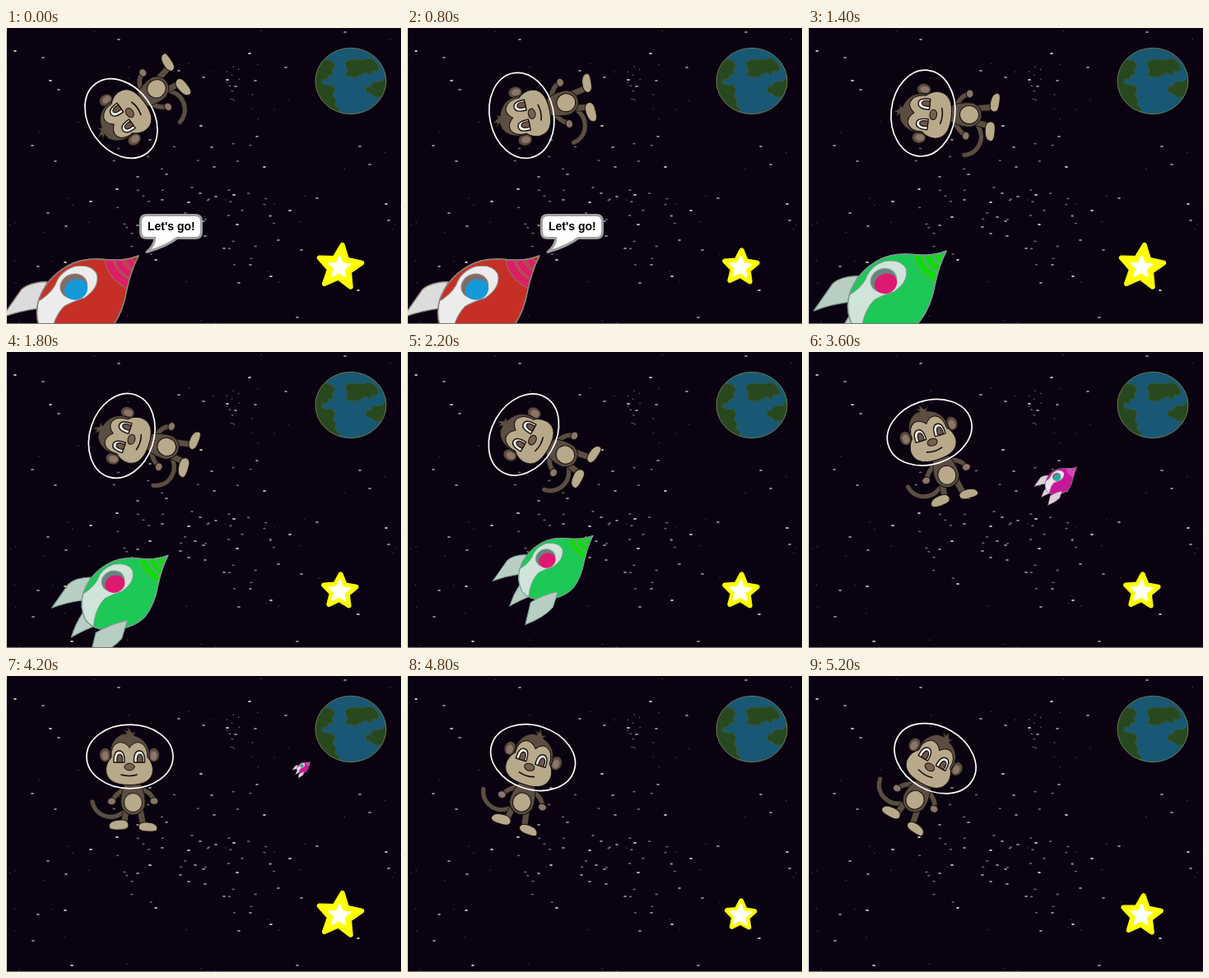
An HTML page with a canvas for the animation above (5400 ms loop, 480 by 360 pixels).

```html
<!DOCTYPE html>
<html lang="en">
<head>
<meta charset="utf-8">
<title>Space trip</title>
<style>
html, body { margin: 0; width: 100%; height: 100%; overflow: hidden; background: #0a0210; }
canvas { display: block; }
</style>
</head>
<body>
<canvas id="stage" width="480" height="360"></canvas>
<script>
const ctx = document.getElementById('stage').getContext('2d');
const LOOP = 5400, STEP = 200, TAU = Math.PI * 2;

const bright = [
  11,28, 45,36, 137,14, 296,31, 412,5, 210,52, 54,64, 64,75, 340,48, 445,55, 240,60,
  32,143, 103,211, 242,253, 39,290, 72,285, 51,225, 73,241, 462,214, 378,207, 442,166,
  314,169, 430,144, 305,132, 222,212, 236,201, 331,258, 281,239, 359,270, 33,322, 80,352,
  354,352, 465,234, 428,319, 265,268, 297,288, 182,282, 190,209, 230,230, 135,196, 60,162,
  250,145, 277,203, 175,136, 253,169, 322,302, 283,310, 212,242, 269,63, 279,71, 303,64,
  237,119, 160,181, 195,178, 345,222, 222,250, 240,235, 175,230, 160,240, 255,205
];

const palettes = {
  red: { body: '#c62f25', stripe: '#dc1e66', fin: '#dcdcdc', band: '#ececec', glass: '#1699d8', shade: '#806c66', line: '#8d8078' },
  green: { body: '#1cc856', stripe: '#14d810', fin: '#b9cec3', band: '#d0e4d9', glass: '#de1970', shade: '#66847c', line: '#7d9a94' },
  pink: { body: '#c8189a', stripe: '#e23cc0', fin: '#decfdb', band: '#efe0ec', glass: '#1bb3a2', shade: '#7d6478', line: '#96808f' }
};

function random(seed) {
  return () => (seed = (seed * 16807) % 2147483647) / 2147483647;
}

function paint(fill, stroke, width = 1) {
  if (fill) { ctx.fillStyle = fill; ctx.fill(); }
  if (stroke) { ctx.strokeStyle = stroke; ctx.lineWidth = width; ctx.stroke(); }
}

function oval(x, y, rx, ry, fill, stroke, width, tilt = 0) {
  ctx.beginPath();
  ctx.ellipse(x, y, rx, ry, tilt, 0, TAU);
  paint(fill, stroke, width);
}

function shape(d, fill, stroke, width) {
  const p = new Path2D(d);
  if (fill) { ctx.fillStyle = fill; ctx.fill(p); }
  if (stroke) { ctx.strokeStyle = stroke; ctx.lineWidth = width || 1; ctx.stroke(p); }
  return p;
}

// A limb is a thick line with a thin dark edge.
function limb(d, color, width) {
  shape(d, null, '#15100e', width + 1.6);
  shape(d, null, color, width);
}

function drawSky() {
  ctx.fillStyle = '#0a0210';
  ctx.fillRect(0, 0, 480, 360);
  const rnd = random(77);
  ctx.fillStyle = 'rgba(190,190,200,.4)';
  for (let i = 0; i < 45; i++) ctx.fillRect(rnd() * 480, rnd() * 360, 1.4, 1);
  // Denser dust: a band across the middle and a small cluster above it
  for (let i = 0; i < 40; i++) {
    oval(130 + rnd() * 200, 140 + rnd() * 150, 1.8, 0.9, 'rgba(185,185,192,.55)');
  }
  ctx.fillStyle = 'rgba(200,200,205,.55)';
  for (let i = 0; i < 14; i++) ctx.fillRect(264 + rnd() * 38, 44 + rnd() * 44, 1.4, 1.2);
  for (let i = 0; i < bright.length; i += 2) {
    oval(bright[i], bright[i + 1], 2, 1.1, i % 3 ? 'rgba(205,205,210,.7)' : 'rgba(235,235,235,.85)');
  }
}

function drawEarth() {
  const land = '#28481f', edge = '#3a5630';
  oval(419, 64.5, 43, 40.2, '#185874');
  ctx.save();
  ctx.beginPath();
  ctx.ellipse(419, 64.5, 43, 40.2, 0, 0, TAU);
  ctx.clip();
  shape('M374 60L384 37L396 40L400 46L396 51L398 55L392 58L390 63L385 62L383 67L388 69L397 70L400 76L397 82L401 87L400 94L405 98L404 106L380 96Z', land, edge);
  shape('M412 42L418 38L430 39L443 37L450 42L454 50L449 53L445 52L443 58L437 54L431 57L425 60L413 58L415 52Z', land, edge);
  shape('M466 58L456 65L446 66L443 71L437 72L438 78L444 80L448 84L455 84L466 76Z', land, edge);
  ctx.restore();
  oval(419, 64.5, 43, 40.2, null, '#6e744f', 1);
}

function starPath(x, y, outer, inner, turn) {
  ctx.beginPath();
  for (let i = 0; i < 10; i++) {
    const r = i % 2 ? inner : outer, a = turn - Math.PI / 2 + i * Math.PI / 5;
    ctx.lineTo(x + r * Math.cos(a), y + r * Math.sin(a));
  }
  ctx.closePath();
}

function drawStar(t) {
  const k = Math.abs((t / STEP) % 7 - 3);
  const size = 20.5 + 3.25 * k;
  starPath(405.5, 291, size - 3, size * 0.42, 0.03 + k * 0.03);
  paint('#ffff00', '#ffff00', 6);
  starPath(405, 291, 13.5, 6, 0.05);
  paint('#fff', '#fff', 2);
}

function drawMonkey(t) {
  const fur = '#5c4d42', tan = '#b8a98b', skin = '#8b7567', ink = '#15100e';
  ctx.save();
  ctx.translate(148.3, 106.7);
  ctx.rotate((-126 + 6 * t / STEP) * Math.PI / 180);
  ctx.translate(-148.3, -106.7);

  limb('M142 166Q130 175 117 169Q107 164 105 153', fur, 5);
  limb('M144 138Q133 143 130 151', fur, 5.5);
  limb('M165 138Q177 142 179 150', fur, 5.5);
  oval(128.5, 152.5, 5, 4.3, skin, ink, 1);
  oval(180, 152, 5, 4.3, skin, ink, 1);
  limb('M146 162L144 176', fur, 7);
  limb('M163 162L166 178', fur, 7);
  shape('M125 183Q125 176 138 175Q148 174 149 181Q149 187 139 187Q125 188 125 183Z', tan, ink);
  shape('M184 186Q184 179 173 178Q162 177 161 183Q161 189 172 189Q184 190 184 186Z', tan, ink);
  shape('M144 132Q138 146 140 158Q145 169 154 169Q165 169 169 158Q170 145 164 132Z', fur, ink);
  oval(154.5, 154, 11, 11.5, tan, ink, 1);

  for (const x of [120.5, 179.5]) {
    oval(x, 96, 7, 8.5, fur, ink, 1);
    oval(x, 97, 4, 5.5, skin);
  }
  shape('M127 103Q124 79 140 71L147 70L142 65L148 67L148 61L153 69L158 68L155 72Q177 79 174 103Q174 131 150 131Q126 131 127 103Z', fur, ink);
  shape('M150 87Q144 79 136 81Q127 85 128 99Q122 105 121.5 114Q122 132.5 150 132.5Q178 132.5 178.5 114Q178 105 172 99Q172 85 163 81Q156 79 150 87Z', tan, ink);
  for (const x of [137.5, 162]) {
    shape(`M${x - 6.5} 105Q${x - 7} 91 ${x} 91Q${x + 7} 91 ${x + 6.5} 105Z`, '#f4f2ec', ink, 1.4);
    shape(`M${x - 2.5} 105Q${x - 3.5} 95 ${x + 1} 95Q${x + 5} 96 ${x + 4} 105Z`, '#6d5646', ink, 1.2);
  }
  oval(150, 110.5, 6.2, 4.3, '#78604f', ink, 1);
  shape('M140 120Q150 123 159 120', null, ink, 1.6);
  oval(150.5, 98, 52.5, 38.8, null, '#fff', 1.7);
  ctx.restore();
}

function drawRocket(t) {
  if (t >= 4600) return;
  const run = Math.max(0, t / 1000 - 1.3);
  const c = t < 1400 ? palettes.red : t < 3600 ? palettes.green : palettes.pink;
  const scale = (167 - 50 * run) / 122;
  ctx.save();
  ctx.translate(161 + 72 * run, 277 - 59.5 * run);
  ctx.scale(scale, scale);
  ctx.translate(-226, -223);
  shape('M104.5 278L122 253Q129 246.5 145 246L136 270Q120 272 104.5 278Z', c.fin, c.line);
  shape('M125 308.5Q129 295 137 283L152 296Q140 300 125 308.5Z', c.fin, c.line);
  const body = shape('M226 223Q213 228 198 226.5Q177 224 163 232Q144 243 137.5 262Q133 277 140 291Q148 301 166 301Q189 300 202 287Q212 274 215.5 254Q219 237 226 223Z', c.body);
  ctx.save();
  ctx.clip(body);
  shape('M130 267Q146 260 152 249Q156 237 169 232.5Q184 230 189 239Q192 251 178 260.5Q167 264 160 268Q152 276 149 290L147 306L130 306Z', c.band, c.line, 0.8);
  for (const [r, w] of [[27.5, 7], [19, 6], [11, 5]]) {
    ctx.beginPath();
    ctx.arc(227, 222, r, 0, TAU);
    paint(null, c.line, w + 1.2);
    paint(null, c.stripe, w);
  }
  ctx.restore();
  shape(body, null, c.line);
  ctx.stroke(body);
  oval(168.5, 250, 12, 10.5, c.shade, c.line, 1, -0.4);
  oval(170.5, 253, 10.5, 9, c.glass, null, 1, -0.4);
  shape('M144 331L150.5 304Q165 295 183.5 291L177.5 310Q166 323 144 331Z', c.fin, c.line);
  ctx.restore();
}

function drawBubble() {
  shape('M171 227.5H230Q237.5 227.5 237.5 235V248Q237.5 255.5 230 255.5H208Q196 265 171 272.5Q180 265 181 255.5H171Q163.5 255.5 163.5 248V235Q163.5 227.5 171 227.5Z', '#fff', '#a0a0a0', 3);
  ctx.fillStyle = '#000';
  ctx.font = 'bold 14px "Liberation Sans", Arial, sans-serif';
  ctx.fillText("Let's go!", 172, 246);
}

function draw(t) {
  ctx.lineJoin = ctx.lineCap = 'round';
  drawSky();
  drawEarth();
  drawStar(t);
  drawRocket(t);
  drawMonkey(t);
  if (t < 1400) drawBubble();
  ctx.fillStyle = '#777';
  ctx.fillRect(0, 359, 480, 1);
  ctx.fillStyle = '#e8e8e8';
  ctx.fillRect(0, 0, 1, 360);
}

const start = performance.now();
function tick() {
  const t = (performance.now() - start) % LOOP;
  draw(Math.floor(t / STEP) * STEP);
  requestAnimationFrame(tick);
}
tick();
</script>
</body>
</html>
```
